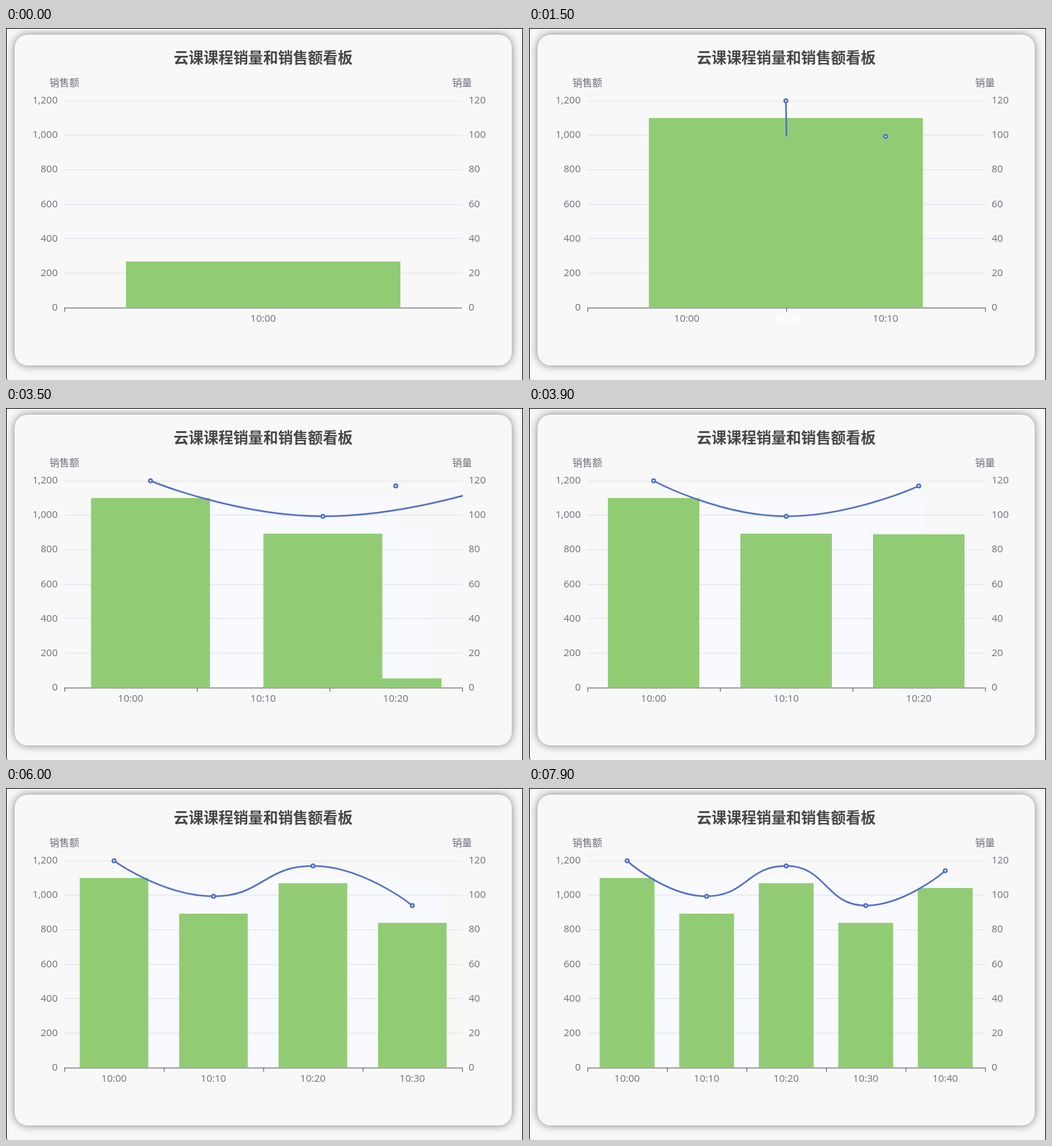
An HTML page that plays this animation: 780x532 px, repeating every 8.1 s.

```html
<!DOCTYPE html>
<html lang="zh">
<head>
<meta charset="utf-8">
<style>
  html, body { margin: 0; width: 100%; height: 100%; overflow: hidden; background: #f8f8f8; }
  #stage { position: relative; width: 780px; height: 532px; overflow: hidden; }
  #edge { position: absolute; inset: 0; box-sizing: border-box; border: solid #000; border-width: 1px 1px 0; border-bottom-left-radius: 4px; }
  #card { position: absolute; left: 13px; top: 10px; width: 750px; height: 500px; border-radius: 20px; background: #f8f8f8; box-shadow: 0 0 12.5px gray; }
  svg { position: absolute; left: 0; top: 0; }
  text { font: 12px "Open Sans", "Noto Sans", "Noto Sans CJK SC", "Noto Sans CJK", sans-serif; fill: #6e7079; }
  .title { font: bold 18px "Noto Sans CJK SC", "Noto Sans CJK", sans-serif; fill: #464646; }
  .faint { font-weight: bold; fill: #fff; }
</style>
</head>
<body>
<div id="stage">
  <div id="edge"></div>
  <div id="card"></div>
  <svg width="780" height="532">
    <defs><clipPath id="plot"><rect x="59" y="79" width="482" height="252"/></clipPath></defs>
    <g id="chart" transform="translate(13 10) scale(1.25)"></g>
  </svg>
</div>
<script>
const LOOP = 8100, STEP = 100;
const LEFT = 60, WIDTH = 480, TOP = 80, HEIGHT = 250, BASE = TOP + HEIGHT;
const BAR_SHARE = 0.69;
const sales = [1100, 893, 1070, 840, 1042];
const counts = [120, 99.4, 117, 94, 114.2];
// Each stage adds one category: first step, and time already elapsed in its tween.
const stages = [[0, 393], [15, 45], [33, 22], [51, 10], [70, 70]];
const STEP_ELAPSED = 105;

const chart = document.getElementById('chart');
const clamp = (v, lo = 0, hi = 1) => Math.min(hi, Math.max(lo, v));
const lerp = (a, b, p) => a + (b - a) * p;
const cubicInOut = t => t < 0.5 ? 4 * t ** 3 : 1 - 4 * (1 - t) ** 3;
const tween = (ms, duration) => cubicInOut(clamp(ms / duration));
const centre = (i, n) => n === 1 ? LEFT + WIDTH / 2 : LEFT + WIDTH / n * (i + 0.5);
const barWidth = n => WIDTH / n * BAR_SHARE;
const countY = v => BASE - v / 120 * HEIGHT;
const barHeight = v => v / 1200 * HEIGHT;

// Put one-pixel lines on half units.
function crisp(v) {
  const d = Math.round(v * 2);
  return d % 2 ? d / 2 : (d + 1) / 2;
}

function add(parent, tag, attrs = {}, content = '') {
  const el = document.createElementNS('http://www.w3.org/2000/svg', tag);
  set(el, attrs);
  el.textContent = content;
  return parent.appendChild(el);
}
function set(el, attrs) {
  for (const key in attrs) el.setAttribute(key, attrs[key]);
}
const group = () => add(chart, 'g');
const label = (parent, x, y, str, anchor = 'middle', cls = '') =>
  add(parent, 'text', { x, y, 'text-anchor': anchor, class: cls }, str);
const line = (parent, x1, y1, x2, y2, stroke) =>
  add(parent, 'line', { x1, y1, x2, y2, stroke });
const box = (parent, fill, x, w, h) =>
  add(parent, 'rect', { x: x - w / 2, y: BASE - h, width: w, height: h, fill });

// Spline through the points that never overshoots a neighbour.
function smoothPath(pts) {
  let d = `M${pts[0]}`, from = pts[0];
  for (let i = 1; i < pts.length; i++) {
    const prev = pts[i - 1], cur = pts[i], next = pts[i + 1];
    let to = cur, out = cur;
    if (next) {
      const a = Math.hypot(cur[0] - prev[0], cur[1] - prev[1]);
      const b = Math.hypot(next[0] - cur[0], next[1] - cur[1]);
      const within = (v, p, q) => clamp(v, Math.min(p, q), Math.max(p, q));
      const ahead = cur.map((c, k) =>
        within(c + (next[k] - prev[k]) * 0.5 * b / (a + b), c, next[k]));
      to = cur.map((c, k) => within(c - (ahead[k] - c) * a / b, prev[k], c));
      out = cur.map((c, k) => c + (c - to[k]) * b / a);
    }
    d += `C${from} ${to} ${cur}`;
    from = out;
  }
  return d;
}

// Pale traces left where earlier bars stood.
const traces = stages.map((_, s) => {
  const g = group();
  for (let i = 0; i < s; i++) box(g, '#f8faff', centre(i, s), barWidth(s), barHeight(sales[i]));
  return g;
});

for (let i = 0; i <= 6; i++) {
  const y = BASE - HEIGHT * i / 6;
  if (i) line(chart, LEFT, crisp(y), LEFT + WIDTH, crisp(y), '#e0e6f1');
  label(chart, 52, y + 3.4, (i * 200).toLocaleString('en-US'), 'end');
  label(chart, 548, y + 3.4, i * 20, 'start');
}
line(chart, LEFT, crisp(BASE), LEFT + WIDTH, crisp(BASE), '#6e7079');
label(chart, 300, 34.4, '云课课程销量和销售额看板', 'middle', 'title');
label(chart, LEFT, 62.4, '销售额');
label(chart, LEFT + WIDTH, 62.4, '销量');

const axes = stages.map((_, s) => {
  const g = group(), n = s + 1;
  if (s === 1) label(g, 300, 347.5, '10:00', 'middle', 'faint');
  for (let i = 0; i <= n; i++) {
    const x = crisp(LEFT + WIDTH / n * i);
    if (s || !i) line(g, x, BASE, x, BASE + 5, '#6e7079');
    if (i < n) label(g, centre(i, n), 347.5, `10:${i}0`);
  }
  return g;
});

const bars = sales.map(() => box(chart, '#91cc75', 0, 0, 0));
const curve = add(chart, 'path', {
  fill: 'none', stroke: '#5470c6', 'stroke-width': 2, 'stroke-linejoin': 'bevel', 'clip-path': 'url(#plot)'
});
const dots = counts.map(v => add(chart, 'circle', {
  cy: countY(v), r: 2, fill: '#fff', stroke: '#5470c6', 'stroke-width': 2
}));

const show = (el, on) => el.setAttribute('display', on ? 'inline' : 'none');

function draw(time) {
  const step = Math.floor(time % LOOP / STEP);
  const s = stages.findLastIndex(([first]) => step >= first);
  const [first, lead] = stages[s];
  const ms = lead + (step - first) * STEP_ELAPSED;
  const n = s + 1, move = tween(ms, 500), grow = tween(ms, 1000);

  [traces, axes].forEach(list => list.forEach((g, i) => show(g, i === s)));
  for (let j = 1; j < s; j++) show(traces[j], true);

  const points = [];
  sales.forEach((v, i) => {
    const on = i < n, fresh = i === s;
    show(bars[i], on);
    show(dots[i], on);
    if (!on) return;

    const end = centre(i, n);
    const x = s ? lerp(centre(i, s), end, move) : end;
    const mid = fresh ? end : x;
    const w = fresh ? barWidth(n) : lerp(barWidth(s), barWidth(n), move);
    const h = barHeight(v) * (fresh ? grow : 1);
    set(bars[i], { x: mid - w / 2, y: BASE - h, width: w, height: h });

    const size = s ? 1 : clamp((ms - 500) / 200);
    set(dots[i], { cx: mid, r: 2 * size, 'stroke-width': size ? 2 : 0 });
    points.push([x, countY(counts[i])]);
  });
  curve.setAttribute('d', s ? smoothPath(points) : '');
}

const start = performance.now();
function tick() {
  draw(performance.now() - start);
  requestAnimationFrame(tick);
}
tick();
</script>
</body>
</html>
```
